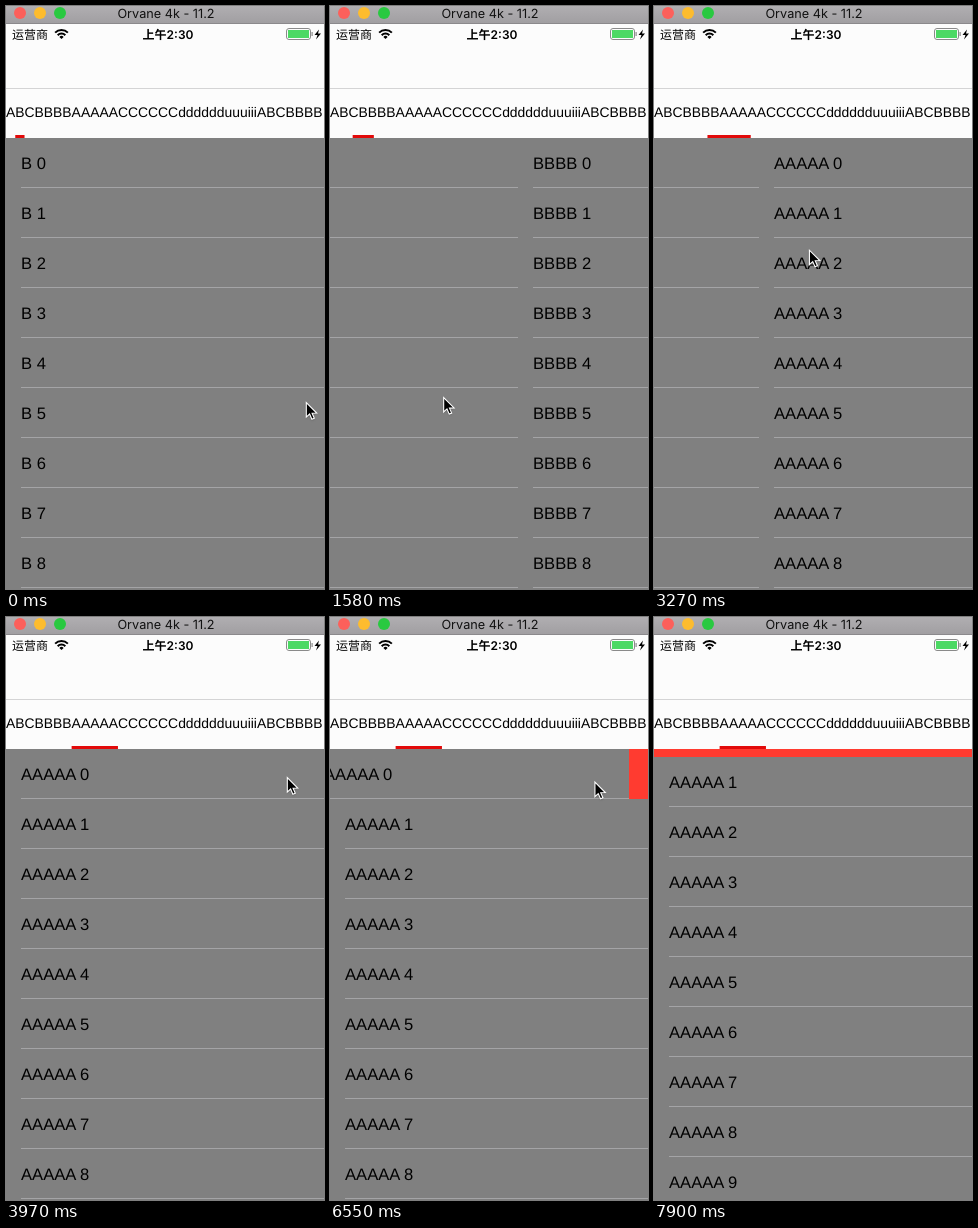
Animation of 318 by 583 pixels, one loop 7990 ms. Source, as an HTML page with a canvas:

```html
<!DOCTYPE html>
<html lang="zh">
<head>
<meta charset="utf-8">
<style>
html, body { margin: 0; width: 100%; height: 100%; overflow: hidden; background: #fcfcfc; }
canvas { display: block; }
</style>
</head>
<body>
<canvas id="stage" width="318" height="583"></canvas>
<script>
const ctx = document.getElementById('stage').getContext('2d');
ctx.textRendering = 'geometricPrecision';
const LOOP = 7990, W = 318, H = 583, PAGE = 320, TOP = 132, ROW = 50;
const UI = 'Inter, "Noto Sans CJK SC", "Noto Sans CJK", sans-serif';
const LABEL = '"Liberation Sans", sans-serif';
const RED = '#ff3b30', GREY = '#808080', LINE = '#a4a4a6';
const TAB_SIZE = 13.9;

const tabs = 'A B C BBBB AAAAA CCCCCC dddddd uuu iii A B C BBBB'.split(' ');
const FIRST = 1, LAST = 4; // tabs whose pages are visited

// Pointer glides: start, end, and the place reached.
const glides = [
  [50, 350, 135, 396], [610, 960, 245, 394],
  [1310, 1660, 75, 390], [1780, 2100, 229, 273],
  [2725, 2820, 100, 273], [3180, 3530, 312, 160],
  [3800, 3970, 281, 160], [4150, 4850, 308, 161],
  [5660, 6290, 290, 163], [6340, 7130, 195, 169], [7260, 7530, -100, 172],
];
// Page drags: finger down, finger up, page at rest.
const drags = [[50, 610, 960], [1310, 1660, 2060], [2725, 3180, 3530]];
const rowDrag = { start: 6340, ratio: .82, removeFrom: 7540, removeTo: 8022 };

const easeOut = k => 1 - (1 - k) ** 2;
const smooth = k => k * k * (3 - 2 * k);
const mix = (a, b, k) => a + (b - a) * k;
const progress = (t, from, to) => Math.min(1, Math.max(0, (t - from) / (to - from)));

function pointer(t) {
  return glides.reduce(([x, y], [from, to, endX, endY]) => {
    const k = progress(t, from, to);
    return [mix(x, endX, k), mix(y, endY, k)];
  }, [300, 396]);
}

const pulled = (t, start) => t < start ? 0 : pointer(start)[0] - pointer(t)[0];

function scrollAt(t) {
  return drags.reduce((sum, [down, up, rest]) =>
    sum + mix(pulled(Math.min(t, up), down), PAGE, easeOut(progress(t, up, rest))), 0);
}

function rect(color, x, y, w, h) {
  ctx.fillStyle = color;
  ctx.fillRect(x, y, w, h);
}

function text(str, x, y, size, { color = '#000', weight = 400, align = 'left', family = UI } = {}) {
  ctx.font = `${weight} ${size}px ${family}`;
  ctx.textAlign = align;
  ctx.fillStyle = color;
  ctx.fillText(str, x, y);
}

function polygon(points, fill) {
  ctx.beginPath();
  points.forEach(([x, y]) => ctx.lineTo(x, y));
  ctx.closePath();
  ctx.fillStyle = fill;
  ctx.fill();
}

function titleBar() {
  const shade = ctx.createLinearGradient(0, 0, 0, 17);
  shade.addColorStop(0, '#b0aeb1');
  shade.addColorStop(1, '#a19fa2');
  rect(shade, 0, 0, W, 17);
  rect('#8b898c', 0, 17, W, 1);
  ['#fc605b', '#fdbc2e', '#29c940'].forEach((color, i) => {
    ctx.beginPath();
    ctx.arc(14 + i * 20, 7, 6, 0, 7);
    ctx.fillStyle = color;
    ctx.fill();
  });
  text('Orvane 4k - 11.2', 160, 12, 12.7, { align: 'center', color: '#111' });
}

function wifi(x, y) {
  ctx.strokeStyle = ctx.fillStyle = '#000';
  ctx.lineWidth = 2;
  const arc = r => ctx.arc(x, y, r, -Math.PI * .75, -Math.PI * .25);
  for (const r of [9, 5.4]) {
    ctx.beginPath();
    arc(r);
    ctx.stroke();
  }
  ctx.beginPath();
  ctx.moveTo(x, y);
  arc(3);
  ctx.fill();
}

function battery(x, y) {
  ctx.strokeStyle = '#8a8a8a';
  ctx.lineWidth = 1;
  ctx.beginPath();
  ctx.roundRect(x + .5, y + .5, 24, 11, 2.5);
  ctx.stroke();
  rect('#4cd964', x + 2, y + 2, 21, 8);
  rect('#8a8a8a', x + 25.5, y + 4, 1.2, 4);
  polygon([[313, 23.5], [308.5, 29], [311.5, 29], [310, 33.5], [315, 27.5], [312, 27.5]], '#000');
}

function tabBar(scroll) {
  const at = FIRST + scroll / PAGE;
  let x = 0, barX = 0, barW = 0;
  tabs.forEach((name, i) => {
    text(name, x, 110.5, TAB_SIZE, { family: LABEL });
    const w = ctx.measureText(name).width;
    const share = Math.max(0, 1 - Math.abs(at - i));
    barX += x * share;
    barW += w * share;
    x += w;
  });
  rect('#e20a0a', barX, 129, barW, 3);
}

function header(scroll) {
  rect('#fcfcfc', 0, 18, W, TOP - 18);
  titleBar();
  text('运营商', 6, 32.5, 12);
  wifi(55.5, 33);
  text('上午2:30', 162, 32.5, 12, { align: 'center', weight: 600 });
  battery(280, 22);
  rect('#d4d4d5', 0, 82, W, 1);
  tabBar(scroll);
}

function row(label, x, y) {
  rect(GREY, x, y, PAGE, ROW);
  rect(LINE, x + 15, y + 49, PAGE - 15, 1);
  text(label, x + 15, y + 31, 16.6, { family: LABEL });
}

function page(name, x, swipe, lift) {
  row(name + ' 0', x - swipe, TOP);
  if (swipe > 0) {
    const edge = PAGE - swipe;
    rect(RED, edge, TOP, swipe, ROW);
    text('删除', edge + 26.5, TOP + 31, 15.5, { color: '#fff', weight: 500 });
  }
  for (let n = 1; n < 11; n++) row(`${name} ${n}`, x, TOP + n * ROW - lift);
}

function cursor(x, y) {
  ctx.save();
  ctx.translate(x + .3, y + .6);
  ctx.shadowColor = 'rgba(0,0,0,.35)';
  ctx.shadowBlur = 2;
  ctx.shadowOffsetY = 1;
  polygon([[0, 0], [0, 14.5], [3.3, 11.4], [5.6, 16.6], [8, 15.6], [5.8, 10.6], [10.4, 10.4]], '#000');
  ctx.shadowColor = 'transparent';
  ctx.strokeStyle = '#fff';
  ctx.lineWidth = 1.1;
  ctx.stroke();
  ctx.restore();
}

function draw(now) {
  const t = now % LOOP;
  const scroll = Math.round(scrollAt(t));
  const swipe = Math.round(Math.min(PAGE, rowDrag.ratio * pulled(t, rowDrag.start)));
  const lift = Math.round(ROW * smooth(progress(t, rowDrag.removeFrom, rowDrag.removeTo)));
  rect(GREY, 0, TOP, W, H - TOP);
  for (let i = FIRST; i <= LAST; i++) {
    const x = (i - FIRST) * PAGE - scroll;
    if (Math.abs(x) < PAGE) page(tabs[i], x, swipe, lift);
  }
  header(scroll);
  cursor(...pointer(t));
  requestAnimationFrame(draw);
}
requestAnimationFrame(draw);
</script>
</body>
</html>
```
